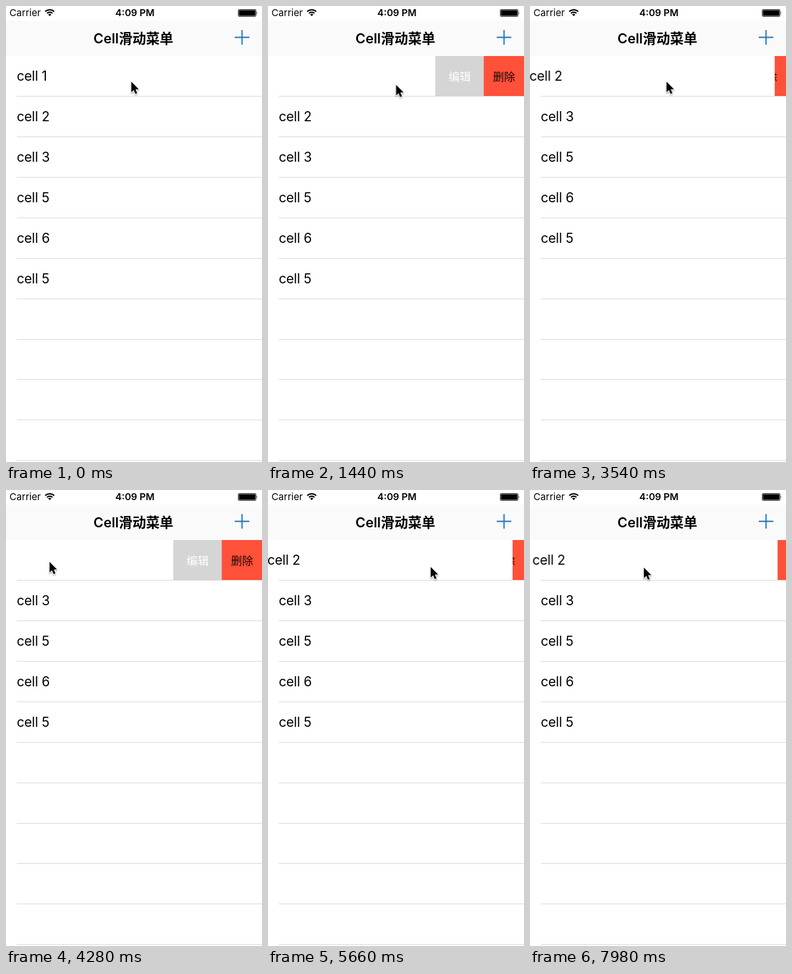
These frames come from a looping animation (404 px wide and 720 px high, 8000 ms). An HTML page:

```html
<!DOCTYPE html>
<html lang="zh-CN">
<head>
<meta charset="utf-8">
<title>Cell滑动菜单</title>
<style>
  html, body { margin: 0; width: 100%; height: 100%; overflow: hidden; background: #fff; }
  svg { display: block; width: 404px; height: 720px; }
  text { font-family: Inter, "Noto Sans CJK SC", "Noto Sans CJK", sans-serif; }
  .row { font-size: 21px; letter-spacing: -.2px; }
  .title { font-size: 21.5px; font-weight: 600; }
  .status { font-size: 15.1px; }
  .action { font-size: 17.5px; text-anchor: middle; }

  #cell, #pointer, #before, #after { animation: 8s linear infinite; }
  #cell { animation-name: swipe; }
  #pointer { animation-name: point; }
  #before { animation-name: leave; }
  #after { animation-name: enter; }

  @keyframes leave { 0%, 27.74% { opacity: 1; } 27.75%, 100% { opacity: 0; } }
  @keyframes enter { 0%, 27.74% { opacity: 0; } 27.75%, 100% { opacity: 1; } }

  @keyframes swipe {
    0%, 7.1% { transform: translateX(0); }
    11.9% { transform: translateX(-47px); animation-timing-function: ease-out; }
    15.9%, 27.74% { transform: translateX(-140px); }
    27.75%, 42.5% { transform: translateX(0); }
    44.25% { transform: translateX(-17.5px); }
    46.25% { transform: translateX(-68px); }
    48.25% { transform: translateX(-118px); }
    50%, 63.75% { transform: translateX(-140px); }
    70% { transform: translateX(-20px); }
    70.75%, 72.75% { transform: translateX(-18px); animation-timing-function: ease-out; }
    76.5%, 98.75% { transform: translateX(0); }
    99.75%, 100% { transform: translateX(-13.3px); }
  }

  @keyframes point {
    0%, .25% { transform: translate(197px, 119px); }
    4.5%, 6.25% { transform: translate(214px, 120px); }
    11.9%, 16.5% { transform: translate(155px, 121px); }
    18% { transform: translate(201px, 124px); }
    21.25% { transform: translate(300px, 122px); }
    25% { transform: translate(366px, 113px); }
    26.5%, 31.75% { transform: translate(368px, 112px); }
    35% { transform: translate(340px, 130px); }
    36.5% { transform: translate(318px, 133px); }
    40% { transform: translate(252px, 124px); }
    41.75% { transform: translate(243px, 120px); }
    44.25% { transform: translate(215px, 119px); }
    46.25% { transform: translate(165px, 118px); }
    48.25% { transform: translate(115px, 116px); }
    50% { transform: translate(85px, 114px); }
    52% { transform: translate(69px, 113px); }
    53.5% { transform: translate(68px, 113px); }
    55% { transform: translate(64px, 115px); }
    61.25% { transform: translate(120px, 120px); }
    63.1% { transform: translate(126px, 120px); }
    70% { transform: translate(254px, 121px); }
    70.75%, 78.25% { transform: translate(256px, 121px); }
    80.75% { transform: translate(251px, 124px); }
    85% { transform: translate(225px, 127px); }
    88.5% { transform: translate(212px, 126px); }
    98.25% { transform: translate(204px, 122px); }
    99.75%, 100% { transform: translate(179px, 122px); }
  }
</style>
</head>
<body>
<svg viewBox="0 0 404 720">
  <defs>
    <filter id="shadow" x="-50%" y="-50%" width="200%" height="200%">
      <feDropShadow dx="0" dy="1.5" stdDeviation="1.2" flood-opacity=".4"/>
    </filter>
  </defs>
  <rect width="404" height="720" fill="#fff"/>

  <!-- row actions, covered by the sliding cell -->
  <rect x="264" y="79" width="77" height="64" fill="#d5d5d5"/>
  <rect x="340.5" y="79" width="64" height="64" fill="#ff5039"/>
  <text class="action" x="302.5" y="117.7" fill="#fff">编辑</text>
  <text class="action" x="372.5" y="117.7" fill="#1c0805">删除</text>
  <g id="cell">
    <rect y="79" width="404" height="64" fill="#fff"/>
    <g id="first"></g>
  </g>
  <g id="lines" fill="#d9d9d9"></g>
  <g id="before"></g>
  <g id="after"></g>

  <!-- status and navigation bars -->
  <rect y="23" width="404" height="56" fill="#fafafa"/>
  <text class="status" x="5.5" y="16">Carrier</text>
  <g fill="none" stroke="#000" stroke-width="2">
    <path d="M61.9 8.9a10 10 0 0 1 14.2 0M64.6 11.6a6.3 6.3 0 0 1 8.8 0"/>
    <path d="M69 16l-2.5-2.5a3.6 3.6 0 0 1 5 0z" fill="#000" stroke="none"/>
  </g>
  <text class="status" x="203.5" y="16" font-weight="600" text-anchor="middle">4:09 PM</text>
  <rect x="366.5" y="5.5" width="28" height="11" rx="1.5" fill="none" stroke="#000" stroke-width=".8"/>
  <rect x="367.5" y="6.5" width="26" height="9" rx=".8"/>
  <path d="M395.7 9q1.8 2 0 4z"/>
  <text class="title" x="201" y="59" text-anchor="middle">Cell滑动菜单</text>
  <path d="M361 49.5h23M372.5 38v23" stroke="#0b74d3" stroke-width="1.9"/>

  <g id="pointer">
    <path d="M.7.5V17.3L4.6 13.7 7.2 19.8 10 18.6 7.4 12.6H12.6Z" stroke="#fff" stroke-width="1.6"
      paint-order="stroke" stroke-linejoin="round" filter="url(#shadow)"/>
  </g>
</svg>
<script>
  const PITCH = 63.87;
  const byId = id => document.getElementById(id);

  function add(parent, tag, attrs, content = '') {
    const node = document.createElementNS(parent.namespaceURI, tag);
    for (const [key, value] of Object.entries(attrs)) node.setAttribute(key, value);
    node.textContent = content;
    return parent.appendChild(node);
  }

  const addRow = (parent, index, number) =>
    add(parent, 'text', { class: 'row', x: 17, y: 118.4 + index * PITCH }, `cell ${number}`);

  for (let i = 0; i < 10; i++)
    add(byId('lines'), 'rect', { x: 17, y: Math.round(142.4 + i * PITCH), width: 387, height: 1 });

  // The top label travels with the cell, so it swaps inside that group.
  for (const [id, numbers] of [['before', [1, 2, 3, 5, 6, 5]], ['after', [2, 3, 5, 6, 5]]]) {
    numbers.forEach((number, i) => {
      const label = addRow(byId(i ? id : 'first'), i, number);
      if (!i) label.style.animation = `${id === 'before' ? 'leave' : 'enter'} 8s linear infinite`;
    });
  }
</script>
</body>
</html>
```
